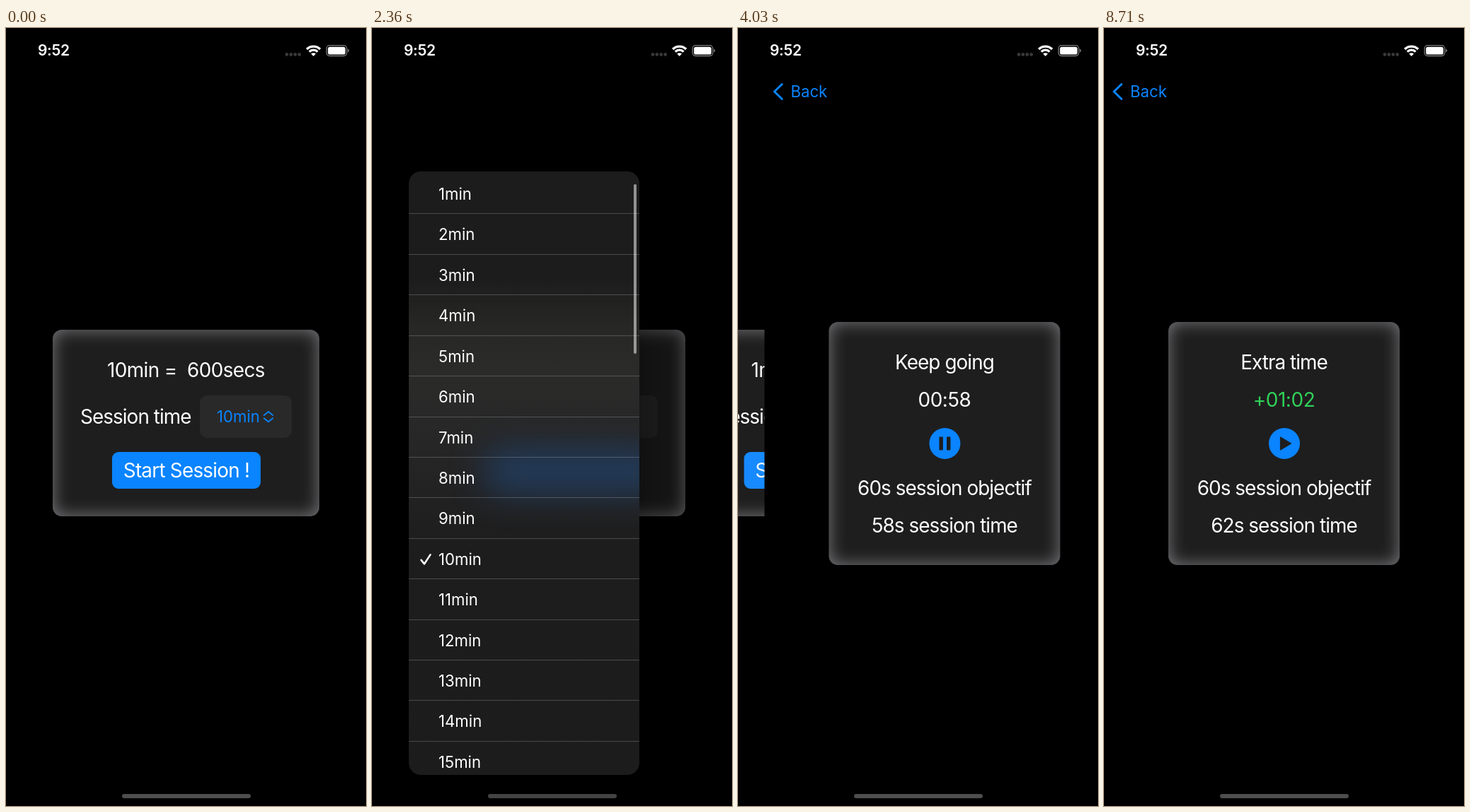
Animation, 509 px wide and 1101 px high, one loop 8.75 s. Source, as an HTML page:

```html
<!DOCTYPE html>
<html lang="en">
<head>
<meta charset="utf-8">
<title>Session timer</title>
<style>
html, body { margin: 0; width: 100%; height: 100%; overflow: hidden; background: #000; }
body { position: relative; color: #fff; font: 400 27.9px/40px Inter, Roboto, sans-serif; font-optical-sizing: none; letter-spacing: -.034em; }
div, svg, span { position: absolute; box-sizing: border-box; }
svg { overflow: visible; fill: none; stroke-linecap: round; stroke-linejoin: round; }
div, span { white-space: pre; }
.page { left: 0; top: 0; width: 509px; height: 1101px; background: #000; }
.card { background: #1e1e1e; border-radius: 13px; box-shadow: inset 0 0 25px rgba(235, 235, 245, .46); }
.mid { left: 0; width: 509px; height: 40px; text-align: center; }
.num { letter-spacing: -.015em; }
.small { font-size: 22.2px; letter-spacing: 0; }
.blue { color: #0a84ff; stroke: #0a84ff; }
#chip { top: 519.5px; height: 60.5px; border-radius: 10px; background: #292929; }
#start { left: 150px; top: 599.5px; width: 210px; height: 52.5px; border-radius: 9px; line-height: 53px; text-align: center; letter-spacing: -.028em; }
#menu { left: 52px; top: 203px; width: 326px; height: 853.5px; border-radius: 17px; overflow: hidden; transform-origin: 287px 347px;
  background: linear-gradient(#1c1c1c 150px, #272726 220px, #2b2b2a 280px, #282828 357px, #232324 440px, #1d1d1d 535px, #1c1c1c); }
#shade { left: 52px; top: 203px; width: 326px; height: 853.5px; border-radius: 17px; box-shadow: 0 0 70px rgba(0, 0, 0, .45); }
#glow { left: 108px; top: 391px; width: 260px; height: 66px; border-radius: 24px; background: #223a58; filter: blur(23px); }
.row { left: 0; width: 326px; height: 57.42px; padding-left: 42px; line-height: 57.4px; border-bottom: 1px solid rgba(235, 235, 235, .22); }
#bar { left: 318px; width: 4px; border-radius: 2px; background: #fff; }
#dim { left: 0; top: 0; width: 509px; height: 1101px; background: #000; }
#grip { left: 164px; top: 1084px; width: 182px; height: 6px; border-radius: 3px; }
</style>
</head>
<body>
<div class="page" id="home">
  <div class="card" id="box" style="top:427px;height:264px"></div>
  <div class="mid" id="sum" style="top:464px;letter-spacing:-.022em"></div>
  <span id="label" style="top:530px">Session time</span>
  <div id="chip">
    <span class="small blue" id="pick" style="left:24px;top:10.5px"></span>
    <svg class="blue" width="14" height="16" style="right:25.5px;top:22.5px" stroke-width="1.9"><path d="M.8 6l6.2-5 6.2 5M.8 10.2l6.2 5 6.2-5"/></svg>
  </div>
  <div id="start">Start Session !</div>
</div>
<div id="dim"></div>
<div id="shade"></div>
<div id="menu">
  <div id="glow"></div>
  <div class="small" id="list" style="left:0;top:0"></div>
  <div id="bar"></div>
</div>
<div class="page" id="timer">
  <svg class="blue" width="14" height="24" style="left:12px;top:78px" stroke-width="3"><path d="M12.8 1.5L2 12l10.8 10.5"/></svg>
  <span class="small blue" style="left:37px;top:70px">Back</span>
  <div class="card" style="left:91px;top:416px;width:327px;height:344px"></div>
  <div class="mid" id="head" style="top:452.5px"></div>
  <div class="mid num" id="clock" style="top:506px"></div>
  <svg id="toggle" width="44" height="44" style="left:232.5px;top:566px">
    <circle cx="22" cy="22" r="22" fill="#0a84ff"/>
    <path id="icon" fill="#1e1e1e" stroke="#1e1e1e" stroke-width="1.4"/>
  </svg>
  <div class="mid" style="top:630.5px">60s session objectif</div>
  <div class="mid" id="spent" style="top:684px"></div>
</div>
<div class="num" style="left:45px;top:12px;font-size:21px;font-weight:600">9:52</div>
<svg width="509" height="60" style="left:0;top:0">
  <g fill="#383838"><circle cx="397" cy="37.5" r="2.4"/><circle cx="402.9" cy="37.5" r="2.4"/><circle cx="408.8" cy="37.5" r="2.4"/><circle cx="414.7" cy="37.5" r="2.4"/></g>
  <g stroke="#fff" stroke-width="3.2" stroke-linecap="butt"><path d="M425.2 30a13.4 13.4 0 0 1 19 0M428.8 33.6a8.4 8.4 0 0 1 11.8 0"/></g>
  <path fill="#fff" d="M434.7 40l-3.3-3.4a4.7 4.7 0 0 1 6.6 0z"/>
  <rect x="453.2" y="24.7" width="28.6" height="14.8" rx="4.4" stroke="#7c7c7c" stroke-width="1.3"/>
  <rect x="455.2" y="26.7" width="24.6" height="10.8" rx="2.6" fill="#fff"/>
  <path fill="#7c7c7c" d="M483.3 29.6q1.9.8 1.9 2.5t-1.9 2.5z"/>
</svg>
<div id="grip"></div>
<script>
const LOOP = 8750, ROW = 57.42, WIDTH = 509;
const $ = id => document.getElementById(id);
const clamp = x => Math.min(1, Math.max(0, x));
const ramp = (t, from, to) => clamp((t - from) / (to - from));
const mix = (a, b, p) => a + (b - a) * p;
// critically damped spring, 0 to 1
const spring = (t, start, speed) => {
  const x = Math.max(0, t - start) / 1000 * speed;
  return 1 - (1 + x) * Math.exp(-x);
};
const PAUSE = 'M14.7 13.3h4v17.4h-4zM25.3 13.3h4v17.4h-4z';
const PLAY = 'M16.6 13.2L31.4 22 16.6 30.8z';

for (let i = 0; i < 20; i++) {
  const row = document.createElement('div');
  row.className = 'row';
  row.style.top = i * ROW + 'px';
  row.textContent = i + 1 + 'min';
  if (i === 9) row.innerHTML += '<svg width="16" height="16" style="left:16px;top:21px" stroke="#fff" stroke-width="2.6"><path d="M1.5 9l4.5 5.5L14.5 1.5"/></svg>';
  $('list').append(row);
}

function drawHome(t) {
  const mins = t < 2680 ? 10 : 1;
  const inset = mins === 10 ? 0 : 6.75;
  $('box').style.left = 66 + inset + 'px';
  $('box').style.width = 377 - 2 * inset + 'px';
  $('label').style.left = 105 + inset + 'px';
  $('chip').style.left = 274 + inset + 'px';
  $('chip').style.width = 129.5 - 2 * inset + 'px';
  $('sum').textContent = `${mins}min =  ${mins * 60}secs`;
  $('pick').textContent = mins + 'min';
  const press = t < 3590 ? 0 : 1 - ramp(t, 3880, 4100);
  $('start').style.background = `rgb(${mix(10, 51, press)},${mix(132, 150, press)},255)`;
  $('start').style.color = `rgba(255,255,255,${mix(1, .78, press)})`;
}

function scrollAt(t) {
  const pull = ramp(t, 1760, 2050);
  const eased = 1 - (1 - pull) ** 2;
  return t < 2050 ? mix(118.6, -35, eased) : -35 * Math.exp((2050 - t) / 125);
}

function drawMenu(t) {
  const open = spring(t, 845, 16), shut = spring(t, 2650, 19);
  const gone = t >= 3010;
  const alpha = gone ? 0 : clamp(open * 2.5) * clamp(1 - shut * 1.1);
  const scale = mix(.15, 1, open) * mix(1, .2, shut);
  for (const id of ['menu', 'shade']) $(id).style.opacity = alpha;
  $('menu').style.transform = `scale(${scale})`;
  $('dim').style.opacity = gone ? 0 : .26 * open * (1 - shut);
  const y = scrollAt(t);
  $('list').style.transform = `translateY(${-y}px)`;
  $('bar').style.top = 18 + Math.max(0, y) * .219 + 'px';
  $('bar').style.height = 243 + Math.min(0, y) + 'px';
  $('bar').style.opacity = t < 1760 ? .5 * (1 - ramp(t, 1640, 1750)) : .52 * ramp(t, 1760, 1850) * (1 - ramp(t, 2380, 2610));
}

function drawTimer(t) {
  const secs = 58 + [4610, 5590, 6600, 7620].filter(s => t >= s).length;
  const extra = secs >= 60;
  const pad = n => String(n).padStart(2, '0');
  $('head').textContent = extra ? 'Extra time' : 'Keep going';
  $('clock').textContent = (extra ? '+' : '') + pad(Math.floor(secs / 60)) + ':' + pad(secs % 60);
  $('clock').style.color = extra ? '#30d158' : '#fff';
  $('spent').textContent = secs + 's session time';
  $('icon').setAttribute('d', t < 8400 ? PAUSE : PLAY);
  $('toggle').style.opacity = 1 - .7 * ramp(t, 8140, 8260) * (1 - ramp(t, 8400, 8700));
}

function draw(t) {
  drawHome(t);
  drawMenu(t);
  drawTimer(t);
  const push = t >= 4600 ? 1 : spring(t, 3764, 16);
  $('home').style.transform = `translateX(${-.3 * WIDTH * push}px)`;
  $('timer').style.transform = `translateX(${WIDTH * (1 - push)}px)`;
  const grey = t >= 6600 && t < 7620 ? 44 : 77 - 40 * $('dim').style.opacity;
  $('grip').style.background = `rgb(${grey},${grey},${grey})`;
}

const begin = performance.now();
function tick() {
  draw((performance.now() - begin) % LOOP);
  requestAnimationFrame(tick);
}
draw(0);
requestAnimationFrame(tick);
</script>
</body>
</html>
```
